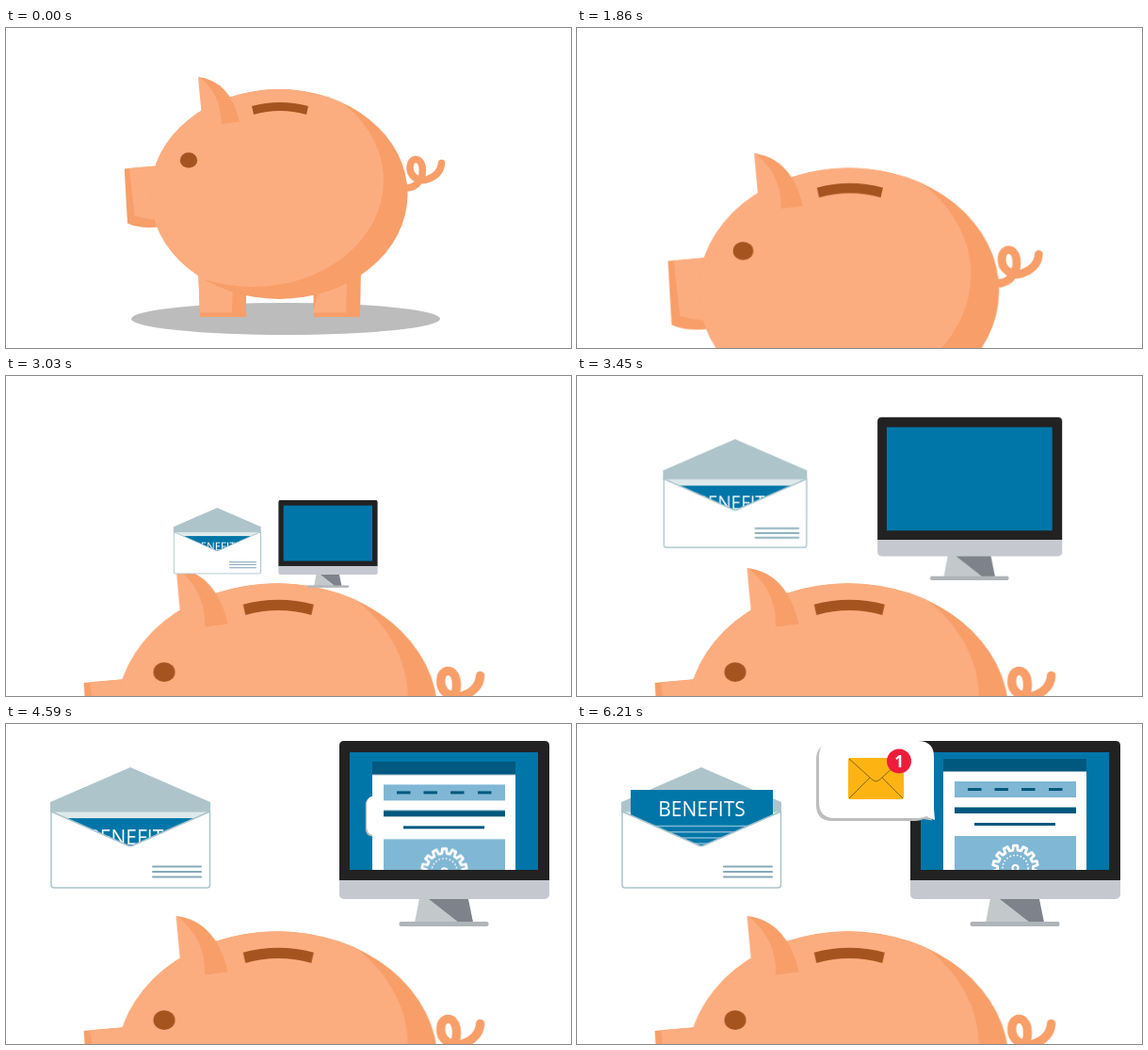
Animation, 600 px wide and 340 px high, one loop 6.39 s. Source, as an HTML page:

```html
<!DOCTYPE html>
<html lang="en">
<head>
<meta charset="utf-8">
<title>Piggy bank</title>
<style>
html, body { margin: 0; width: 100%; height: 100%; overflow: hidden; background: #fff; }
svg { display: block; width: 600px; height: 340px; }
text { font-family: "Open Sans", "Noto Sans", sans-serif; fill: #fff; text-anchor: middle; }

.light { fill: #fcad80; }
.dark { fill: #f89e68; }
.brown { fill: #a6541f; }
.navy { fill: #00587f; }
.blue { fill: #0076a8; }
.sky { fill: #80b7d4; }
.white { fill: #fff; }

.move { animation: 6390ms linear infinite; }

/* coins and pig */
.coin { animation-name: coin; }
.pig-y { animation-name: pig-y; }
.pig-size { animation-name: pig-size; transform-origin: 298px 0; }
@keyframes coin {
  0%, .47% { transform: translateY(-26px); animation-timing-function: ease-in; }
  10.56% { transform: translateY(114px); animation-timing-function: step-end; }
  10.57% { transform: translateY(-26px); animation-timing-function: ease-in; }
  20.66%, 100% { transform: translateY(118px); }
}
@keyframes pig-y {
  0%, 21.04% { transform: none; animation-timing-function: cubic-bezier(.65, 0, .35, 1); }
  36.96%, 100% { transform: translateY(139px); }
}
@keyframes pig-size {
  0%, 21.04% { transform: none; animation-timing-function: cubic-bezier(.48, 0, .32, 1); }
  36.96%, 100% { transform: scale(1.25); }
}

/* envelope and monitor leave the slot */
.mail { --x: 157px; --y: 136px; transform-origin: 132px 110px; }
.screen { --x: -176.5px; --y: 130px; transform-origin: 465.5px 116px; }
.out-x { animation-name: out-x; }
.screen.out-x { animation-name: out-x-late; }
.out-y { animation-name: out-y; }
.grow { animation-name: grow; }
.screen.grow { animation-name: grow-late; }
@keyframes out-x {
  0%, 39.44% { transform: translateX(var(--x)); animation-timing-function: cubic-bezier(.1, 0, .77, 1); }
  60.56%, 100% { transform: none; }
}
@keyframes out-x-late {
  0%, 39.44% { transform: translateX(var(--x)); animation-timing-function: cubic-bezier(.32, 0, .75, 1); }
  60.56%, 100% { transform: none; }
}
@keyframes out-y {
  0%, 39.44% { transform: translateY(var(--y)); animation-timing-function: cubic-bezier(.22, 0, .42, 1); }
  60.56%, 100% { transform: none; }
}
@keyframes grow {
  0%, 39.44% { transform: scale(0); animation-timing-function: cubic-bezier(.2, 0, .4, 1); }
  60.56%, 100% { transform: none; }
}
@keyframes grow-late {
  0%, 39.44% { transform: scale(0); animation-timing-function: cubic-bezier(.27, 0, .45, 1); }
  60.56%, 100% { transform: none; }
}

/* page, bubble and letter */
.page { animation-name: page; }
.bubble { animation-name: bubble; }
.bubble-size { animation-name: bubble-size; transform-origin: 317px 60px; }
.letter { animation-name: letter; }
@keyframes page {
  0%, 61.5% { transform: translateY(119px); animation-timing-function: ease-in-out; }
  73.24%, 100% { transform: none; }
}
@keyframes bubble {
  0%, 67.37% { transform: translate(149px, 58px); animation-timing-function: ease-in-out; }
  78.25%, 100% { transform: none; }
}
@keyframes bubble-size {
  0%, 67.37% { transform: scale(0); animation-timing-function: cubic-bezier(.25, 0, .5, 1); }
  78.25%, 100% { transform: none; }
}
@keyframes letter {
  0%, 70.42% { transform: translateY(31px); animation-timing-function: ease-in-out; }
  82.16%, 100% { transform: none; }
}
</style>
</head>
<body>
<svg viewBox="0 0 600 340">
  <defs>
    <clipPath id="body"><ellipse cx="290" cy="176.5" rx="136.5" ry="111.5"/></clipPath>
    <clipPath id="above-slot"><path d="M200 -60H380V92H319Q291 84 263 92H200Z"/></clipPath>
    <clipPath id="display"><rect x="365" y="30" width="200" height="125"/></clipPath>
  </defs>

  <g class="move pig-y"><g class="move pig-size">
    <ellipse cx="297" cy="309" rx="164" ry="17" fill="#bcbcbc"/>
    <path fill="none" stroke="#f89e68" stroke-width="7.5" stroke-linecap="round"
      d="M424 170C438 170 444 158 442 147C440 137 430 137 429 147C428 157 438 164 447 161C456 158 462 152 462.500 143.500"/>
    <!-- legs -->
    <path class="dark" d="M204 255L206 307H255V270ZM326 270L327 307H376L377 255Z"/>
    <path class="light" d="M204 255L206 302.500H240L241 270ZM326 302.500L335 270H362L361 302.500Z"/>
    <!-- snout -->
    <path class="dark" d="M125.700 149.500L165 146V211Q143 214 129 207.500Z"/>
    <path class="light" d="M131 149L170 146V205Q150 203 136.500 199.500Z"/>
    <!-- body -->
    <g clip-path="url(#body)">
      <rect class="dark" x="150" y="60" width="280" height="230"/>
      <ellipse class="light" cx="262" cy="162" rx="139" ry="113"/>
    </g>
    <!-- ear -->
    <path class="light" d="M204 52L207.500 90L229 102L236 75Z"/>
    <path class="dark" d="M204 52Q238 56 248 99.500L228.500 102Q229 69 204 52Z"/>
    <ellipse class="brown" cx="194" cy="140.500" rx="9.200" ry="8.300"/>
    <path class="brown" d="M261 83Q291 75 321 83L319 92Q291 84 263 92Z"/>
    <g clip-path="url(#above-slot)">
      <g class="move coin">
        <circle cx="291" r="24" fill="#fcbe48"/>
        <circle cx="291" r="17" fill="#fdc933" stroke="#e0913a" stroke-width="2"/>
      </g>
    </g>
  </g></g>

  <g class="move mail out-x"><g class="move mail out-y"><g class="move mail grow">
    <path fill="#aec4cb" d="M47 83L132 46L217 83V94H47Z"/>
    <path fill="#dfe9eb" d="M48 93.500H217V140H48Z"/>
    <g class="move letter">
      <rect class="blue" x="57" y="70" width="151" height="70"/>
      <text x="132.500" y="98" font-size="21">BENEFITS</text>
      <path stroke="#80b7d4" stroke-width="1.500" d="M65 108.500H200M65 114.700H200M65 120.900H200M65 127H200"/>
    </g>
    <path fill="#fff" stroke="#aac4cc" stroke-width="1.500" stroke-linejoin="round"
      d="M48 93L128 128.500Q132 131 136 128.500L216.500 93V171Q216.500 174 213.500 174H51Q48 174 48 171Z"/>
    <path stroke="#84a9b8" stroke-width="2" stroke-linecap="round" d="M156 151.500H207M156 157H207M156 162.500H207"/>
  </g></g></g>

  <g class="move screen out-x"><g class="move screen out-y"><g class="move screen grow">
    <path fill="#c3c9cb" d="M439 185H490L496 211H434Z"/>
    <path fill="#7e838b" d="M449 186H491L496 211H481Z"/>
    <rect x="417.500" y="210" width="95" height="5" rx="2" fill="#afb4b8"/>
    <rect x="354" y="150" width="223" height="36" rx="5" fill="#c6c8d0"/>
    <path fill="#222" d="M354 166V23Q354 18 359 18H572Q577 18 577 23V166Z"/>
    <rect class="blue" x="365" y="30" width="200" height="125"/>

    <g class="move bubble"><g class="move bubble-size">
      <path fill="#bdbdbd" transform="translate(-3 3)"
        d="M274 18H362Q379 18 379 35V88L380 99.500L371 98Q367 100 362 100H274Q257 100 257 83V35Q257 18 274 18Z"/>
      <path class="white"
        d="M274 18H362Q379 18 379 35V90L380 102L371 98Q367 100 362 100H274Q257 100 257 83V35Q257 18 274 18Z"/>
      <rect x="288" y="36" width="59" height="44" rx="2" fill="#fdb413"/>
      <path fill="none" stroke="#8f6510" d="M289 37L314 59.500Q317.500 62.500 321 59.500L346 37M289 79L311 57M346 79L324 57"/>
      <circle cx="342" cy="39.500" r="13" fill="#ee1c3b"/>
      <text x="342" y="45.500" font-size="17" font-weight="700">1</text>
    </g></g>

    <g clip-path="url(#display)"><g class="move page">
      <rect class="white" x="389" y="37" width="152" height="130"/>
      <rect class="navy" x="389" y="37" width="152" height="13.500"/>
      <rect class="sky" x="401" y="61" width="129" height="17"/>
      <path stroke="#00587f" stroke-width="3.200" d="M415 69.500H429.500M443.500 69.500H458M472 69.500H486.500M501 69.500H515.500"/>
      <rect class="navy" x="401" y="88.500" width="129" height="6.500"/>
      <rect class="navy" x="422" y="105" width="86" height="3"/>
      <rect class="sky" x="401" y="119" width="129" height="50"/>
      <g transform="translate(465.500 153)" fill="none" stroke="#fff">
        <path id="gear" stroke-width="2.800" stroke-linejoin="round"/>
        <circle r="13.500" stroke-width="1.600" stroke-dasharray="1.600 2.200"/>
        <circle r="3" stroke-width="2"/>
      </g>
    </g></g>
  </g></g></g>
</svg>
<script>
// Gear outline: each tooth is two outer and two inner corners.
const teeth = 14, corners = [[-.3, 19], [-.2, 24], [.2, 24], [.3, 19]];
const points = [];
for (let i = 0; i < teeth; i++) {
  for (const [shift, r] of corners) {
    const a = (i + shift) / teeth * 2 * Math.PI - Math.PI / 2;
    points.push((r * Math.cos(a)).toFixed(2) + " " + (r * Math.sin(a)).toFixed(2));
  }
}
document.getElementById("gear").setAttribute("d", "M" + points.join("L") + "Z");
</script>
</body>
</html>
```
